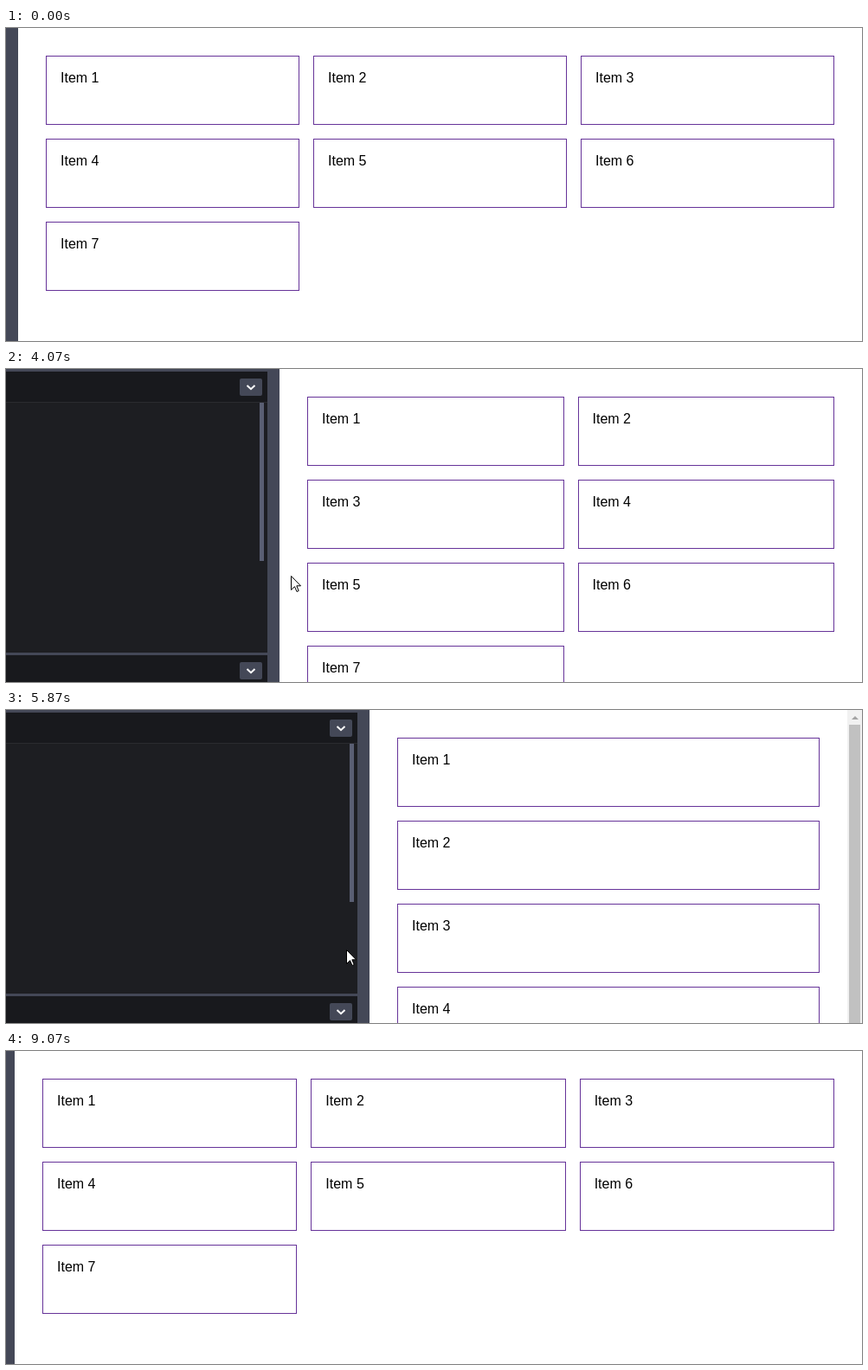
Write an HTML page that moves like this. It is 989 px wide and 362 px high and loops after 9.94 s.

```html
<!DOCTYPE html>
<html lang="en">
<head>
<meta charset="utf-8">
<title>Responsive grid</title>
<style>
  * { box-sizing: border-box; }
  html, body { margin: 0; width: 100%; height: 100%; overflow: hidden; background: #fff; }
  #stage { position: relative; width: 989px; height: 362px; overflow: hidden; background: #fff; isolation: isolate; }
  #stage > * { position: absolute; }
  #grid {
    top: 0; right: 0; padding: 32px;
    display: grid; gap: 16px; grid-auto-rows: 80px;
    grid-template-columns: repeat(auto-fill, minmax(250px, 1fr));
    font: 16px Arial, "Liberation Sans", sans-serif; color: #000;
  }
  #grid div { border: 1px solid #639; padding: 16px; }
  #editor { top: 0; width: 700px; height: 362px; background: #1d1e22; border-right: 14px solid #444857; }
  #editor > * { position: absolute; }
  .bar { left: 0; right: 0; height: 39px; background: #18191d; border-top: 3px solid #444857; border-bottom: 1px solid #2a2b30; }
  .bar svg { position: absolute; right: 6px; top: 8px; width: 26px; height: 20px; background: #444857; border-radius: 2px; }
  .thumb { right: 4px; top: 39px; width: 5px; height: 183px; background: #5a5f73; }
  #scroll { right: 0; top: 0; width: 17px; height: 362px; background: #f1f1f1; }
  #scroll::before { content: ""; position: absolute; left: 5px; top: 7px; border: 4px solid transparent; border-top: 0; border-bottom-color: #a3a3a3; }
  #scroll::after { content: ""; position: absolute; left: 2px; top: 17px; width: 13px; bottom: 0; background: #c1c1c1; }
  #arrow, #resize { left: 0; top: 0; overflow: visible; }
  #resize { mix-blend-mode: difference; }
</style>
</head>
<body>
<div id="stage">
  <div id="grid"></div>
  <div id="scroll"></div>
  <div id="editor">
    <div class="bar" style="top:0"><svg><path d="M8.5 8 13 12.2 17.5 8" fill="none" stroke="#fff" stroke-width="2"/></svg></div>
    <div class="thumb"></div>
    <div class="bar" style="top:328px"><svg><path d="M8.5 8 13 12.2 17.5 8" fill="none" stroke="#fff" stroke-width="2"/></svg></div>
  </div>
  <svg id="arrow" width="12" height="19"><path d="M.5.5V16.5L4.5 12.7 7 18.5 9.2 17.5 6.8 11.8H11.5Z" fill="#fff" stroke="#000"/></svg>
  <svg id="resize" width="1" height="1"><path d="M-.5-8V9M1.5-8V9M-10 .5H-4M5 .5H11M-7-2.5-10 .5-7 3.5M8-2.5 11 .5 8 3.5" fill="none" stroke="#fff"/></svg>
</div>
<script>
const LOOP = 9940, TICK = 1000 / 15;
const [grid, scroll, editor, arrow, resize] =
  ['grid', 'scroll', 'editor', 'arrow', 'resize'].map(id => document.getElementById(id));

for (let i = 1; i <= 7; i++) {
  const item = document.createElement('div');
  item.textContent = 'Item ' + i;
  grid.append(item);
}

// Keys are [tick, value]
const edgeKeys = [[34, 14], [35, 25], [49, 204], [51, 220], [57, 220], [61, 316], [72, 560], [77, 560],
  [80, 553], [92, 326], [96, 225], [99, 225], [109, 61], [113, 24], [114, 24], [120, 10]];
const pointerX = [[35, 18], [37, 46], [49, 208], [51, 213], [57, 213], [61, 329], [71, 553], [77, 553],
  [80, 528], [92, 304], [95, 215], [99, 215], [109, 44], [113, 17], [114, 17], [120, 3]];
const pointerY = [[35, 188], [51, 225], [57, 228], [61, 239], [72, 265], [77, 265], [80, 270],
  [96, 281], [99, 281], [109, 278]];

// Monotone cubic through the keys, flat at both ends
function track(keys, k) {
  const last = keys.length - 1;
  if (k <= keys[0][0]) return keys[0][1];
  if (k >= keys[last][0]) return keys[last][1];
  const i = keys.findIndex(key => key[0] > k) - 1;
  const rate = n => (keys[n + 1][1] - keys[n][1]) / (keys[n + 1][0] - keys[n][0]);
  const slope = n => {
    if (n === 0 || n === last) return 0;
    const a = rate(n - 1), b = rate(n);
    return a * b > 0 ? 2 * a * b / (a + b) : 0;
  };
  const [k0, v0] = keys[i], [k1, v1] = keys[i + 1];
  const h = k1 - k0, u = (k - k0) / h, w = 1 - u;
  return w * w * (1 + 2 * u) * v0 + u * u * (3 - 2 * u) * v1
    + h * u * w * (w * slope(i) - u * slope(i + 1));
}

function pointerAt(k) {
  if (k >= 17 && k < 22) return [14, 181];
  if (k >= 35 && k < 120) return [track(pointerX, k), track(pointerY, k)].map(Math.round);
  if (k >= 134 && k < 136) return [10, 350 + (k - 134) * 5];
  return null;
}

function place(el, visible, pos) {
  el.style.display = visible ? '' : 'none';
  if (visible) el.style.transform = `translate(${pos[0]}px, ${pos[1]}px)`;
}

function draw(now) {
  const k = Math.floor((now % LOOP + 3.4) / TICK);
  const edge = Math.round(track(edgeKeys, k));
  const scrolls = edge > 409;
  editor.style.left = edge - 700 + 'px';
  grid.style.left = edge + 'px';
  grid.style.right = scrolls ? '17px' : 0;
  scroll.style.display = scrolls ? '' : 'none';

  const pos = pointerAt(k);
  const onDivider = pos && k >= 35 && k < 120 && pos[0] >= edge - 14 && pos[0] < edge;
  place(arrow, pos && !onDivider, pos);
  place(resize, onDivider, pos);
  requestAnimationFrame(draw);
}

const start = performance.now();
draw(0);
function draw0() {}
</script>
</body>
</html>
```
